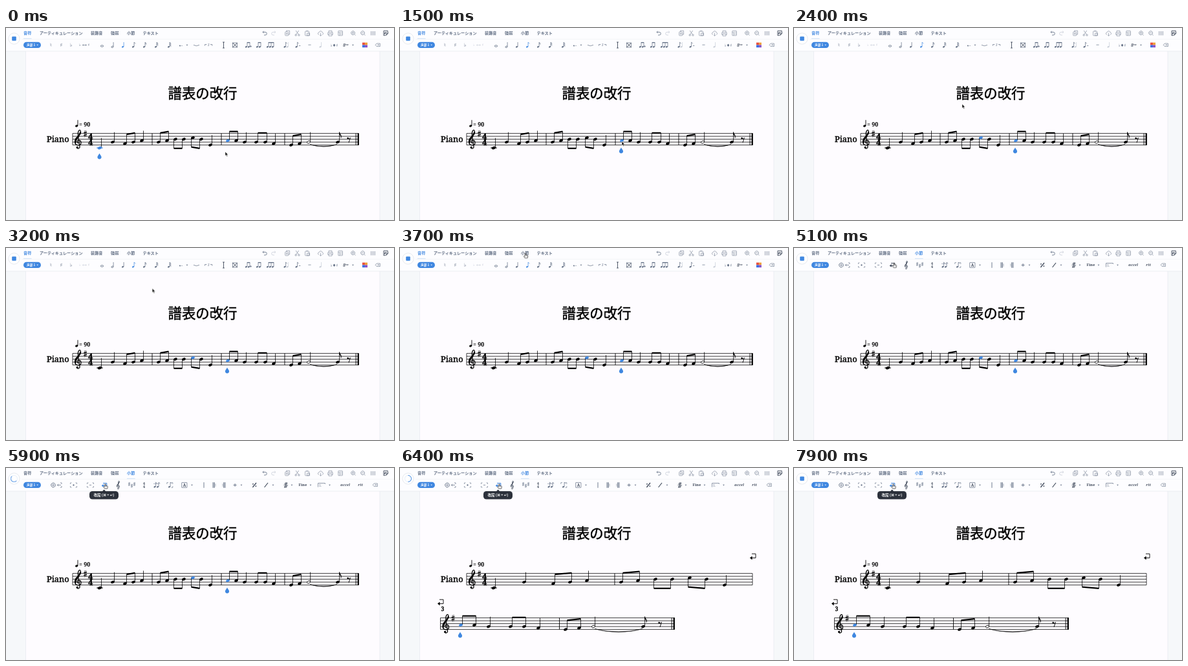
Write an HTML page that moves like this. It is 600 by 298 pixels and loops after 8 s.

```html
<!DOCTYPE html>
<html lang="ja">
<head>
<meta charset="utf-8">
<title>譜表の改行</title>
<style>
html, body { margin: 0; width: 100%; height: 100%; overflow: hidden; background: #f6f8fa; }
svg { display: block; width: 600px; height: 298px; font-family: 'Noto Sans CJK JP', 'Noto Sans', sans-serif; }
.serif { font-family: 'Noto Serif', serif; }
.sym { font-family: 'DejaVu Sans', sans-serif; }
.mid { text-anchor: middle; }
.bold { font-weight: 700; }
.ital { font-style: italic; }
.heavy { stroke: #000; stroke-width: .45px; }
.soft { opacity: .75; }
#pointer { animation: move 8s linear infinite; }
.spin { transform-origin: 12.5px 16.5px; animation: spin .8s steps(8) infinite; }
@keyframes spin { to { transform: rotate(360deg); } }
@keyframes move {
  0% { transform: translate(339px, 192px); }
  3.75% { transform: translate(339px, 192px); animation-timing-function: steps(6, start); }
  11.25% { transform: translate(343px, 176px); }
  25% { transform: translate(343px, 176px); animation-timing-function: steps(2, start); }
  27.5% { transform: translate(291px, 166px); animation-timing-function: steps(3, start); }
  31.25% { transform: translate(260px, 118px); animation-timing-function: steps(2, start); }
  33.75% { transform: translate(252px, 106px); }
  36.25% { transform: translate(252px, 106px); animation-timing-function: steps(9, start); }
  47.5% { transform: translate(194px, 8.5px); }
  52.5% { transform: translate(194px, 8.5px); animation-timing-function: steps(6, start); }
  60% { transform: translate(187.5px, 9px); animation-timing-function: steps(3, start); }
  63.75% { transform: translate(155px, 23px); animation-timing-function: steps(5, start); }
  70%, 100% { transform: translate(153.5px, 25px); }
}
</style>
</head>
<body>
<svg id="stage" viewBox="0 0 600 298"></svg>
<script>
const LOOP = 8000, SELECT = 1100, HOVER = 2100, TAB = 4400, TIP = 5300, BREAK = 6100;
const ink = '#5f6c82', dark = '#414b5c', blue = '#3f87e0', pale = '#c9ced8', black = '#000';
let css = '', count = 0;

// Group that is visible only from a to b (ms)
function show(a, b, body) {
  const key = (t, v) => `${t / LOOP * 100}%{visibility:${v}}`;
  const name = 'show' + count++;
  css += `@keyframes ${name}{${a ? key(0, 'hidden') : ''}${key(a, 'visible')}${b < LOOP ? key(b, 'hidden') : ''}}`;
  return `<g style="animation:${name} ${LOOP}ms step-end infinite">${body}</g>`;
}
const path = (d, c = ink, w = .7, fill = 'none') =>
  `<path d="${d}" stroke="${c}" stroke-width="${w}" fill="${fill}"/>`;
const shape = (d, fill) => path(d, 'none', 0, fill);
const text = (x, y, size, s, c = ink, cls = '') =>
  `<text x="${x}" y="${y}" font-size="${size}" fill="${c}" class="${cls}">${s}</text>`;
const rect = (x, y, w, h, fill, r = 0, stroke = 'none') =>
  `<rect x="${x}" y="${y}" width="${w}" height="${h}" rx="${r}" fill="${fill}" stroke="${stroke}" stroke-width=".7"/>`;
const oval = (x, y, rx, ry, fill, stroke = 'none', turn = -22) =>
  `<ellipse rx="${rx}" ry="${ry}" fill="${fill}" stroke="${stroke}" stroke-width=".8" transform="translate(${x} ${y}) rotate(${turn})"/>`;
const at = (x, y, body, k = 1) => `<g transform="translate(${x} ${y}) scale(${k})">${body}</g>`;
const caret = x => shape(`M${x - 1.4},25.8h2.8l-1.4,1.6z`, ink);

/* ---- score ---- */
const steps = 'CDEFGABc', GAP = 4.5, BASE = 182;
const pitchY = p => BASE - (steps.indexOf(p) - 2) * GAP / 2;
const head = (x, y, c = black) => oval(x, y, 2.9, 2, c);

function clef(c, w = 1.2) {
  return path('M.3,1.6C-2.4,1.2 -2.4,-2.6 .6,-2.8C4.6,-2.9 5,4.3 .3,4.5C-6.4,4.6 -6.6,-3.6 -1.5,-7.5C2.5,-10.5 3.8,-13 3,-16C2.4,-18 1,-17.6 0,-15.5C-1.3,-12.6 -.7,-9.5 0,-6L1.9,6C2.3,9 -.5,10 -2,8.6', c, w)
    + path('M-4.4,1.5C-4.5,-2 -3,-5.5 1,-9M3,-15C3,-12.5 1,-10 -1,-8', c, w + .8) + oval(-1.7, 7.7, 1.5, 1.5, c);
}
const sharp = c => path('M-1,-5.5V6M1.2,-6V5.5', c, .7) + path('M-2.6,-1.4L2.7,-2.8M-2.6,2.8L2.7,1.4', c, 1.4);

function tinted(p, x) {
  const y = pitchY(p), ledger = c => p == 'C' ? path(`M${x - 4.6},${y}h9.2`, c, .8) : '';
  const draw = c => ledger(c) + head(x, y, c);
  if (x == 145) return show(0, SELECT, draw(blue)) + show(SELECT, LOOP, draw(black));
  if (x == 289 && p == 'c') return show(0, HOVER, draw(black)) + show(HOVER, BREAK, draw(blue));
  return draw(x == 343 || x == 94 ? blue : black);
}

// One token per beat: a single letter is a quarter note, two letters are beamed eighths
function bar(tokens, xs) {
  let i = 0;
  return tokens.split(' ').map(tok => {
    const down = [...tok].every(p => 'Bc'.includes(p)), dir = down ? 1 : -1;
    const len = (tok.length > 1 ? 14.2 : 15.4) * dir;
    const notes = [...tok].map(p => ({ p, x: xs[i++], y: pitchY(p) }));
    const ends = notes.map(n => [n.x - 2.5 * dir, n.y + len]);
    return notes.map((n, k) => path(`M${ends[k][0]},${n.y - .5}V${ends[k][1]}`, black, .8)).join('')
      + (ends[1] ? path(`M${ends[0]}L${ends[1]}`, black, 2.2) : '')
      + notes.map(n => tinted(n.p, n.x)).join('');
  }).join('');
}

function staff(x1, x2) {
  let d = `M${x1},164V182M${x2},164V182`;
  for (let k = 0; k < 5; k++) d += `M${x1},${164 + k * GAP}H${x2}`;
  return path(d, black, .75) + at(x1 + 9, 177.5, clef(black), 1.08) + at(x1 + 19.5, 164.5, sharp(black), .9);
}
const barline = x => path(`M${x},164V182`, black, .9);
const finale = x => barline(x - 3.6) + path(`M${x},163.7V182.3`, black, 2.2);

// Tied half and eighth, then the eighth rest
function ending(a, b, r) {
  const y = pitchY('G'), x1 = a + 2, x2 = b - 1, top = y + 3.2;
  const bend = (x2 - x1) / 4, low = top + 1.5 + bend / 4;
  return oval(a, y, 2.6, 1.8, '#fff', black) + path(`M${a + 2.6},${y - .5}V162M${b + 2.6},${y - .5}V162`, black, .8)
    + head(b, y) + path(`M${b + 2.6},162c.3,3 4.2,4.4 2.4,9c.5,-3 -1,-4.5 -2.4,-5z`, black, .5, black)
    + path(`M${x1},${top}C${x1 + bend},${low + 1} ${x2 - bend},${low + 1} ${x2},${top}C${x2 - bend},${low} ${x1 + bend},${low} ${x1},${top}z`, black, .4, black)
    + oval(r - 1.3, 171.4, 1.3, 1.3, black) + path(`M${r - 1.6},172.2Q${r + 1},173 ${r + 2.4},170.8L${r},178.4`, black, .9);
}

const drop = (x, y) => at(x, y, shape('M0,-4.6C.8,-2.4 3.1,-.6 3.1,1.3A3.1,3.1 0 0 1 -3.1,1.3C-3.1,-.6 -.8,-2.4 0,-4.6z', blue));
const wrap = (x, y) => at(x, y, path('M-2,-4.4H4V2H-2.5', black, .9) + shape('M-5,2L-1.4,-.8V4.8z', black));

const tunes = ['C G FG A', 'GA BB cB E', 'AA G GG F', 'EF'];
const meter = [173, 182].map(y => text(130.7, y, 12.6, 4, black, 'serif bold mid heavy')).join('');

const oneLine = staff(103, 545) + meter
  + bar(tunes[0], [145, 165, 184, 197, 210]) + barline(226)
  + bar(tunes[1], [236, 249, 262, 275, 289, 302, 316]) + barline(333)
  + bar(tunes[2], [343, 356, 369, 387, 401, 414]) + barline(431)
  + bar(tunes[3], [441, 454]) + ending(468, 513, 530) + finale(544.7);

const twoLines = staff(103, 545) + meter
  + bar(tunes[0], [145, 192, 237, 263, 289]) + barline(332)
  + bar(tunes[1], [342, 368, 395, 421, 448, 474, 502]) + wrap(546, 138)
  + at(0, 69, staff(62.5, 424.5)
    + bar(tunes[2], [94, 115, 137, 171, 192, 214]) + barline(246.5)
    + bar(tunes[3], [256, 277]) + ending(299, 376, 402) + finale(423.7) + drop(93, 190.4))
  + wrap(63, 209) + text(66, 222.4, 8.6, 3, black, 'serif mid heavy');

const score = text(304, 109.4, 21.4, '譜表の改行', black, 'mid heavy')
  + text(63, 177, 12.8, 'Piano', black, 'serif heavy')
  + oval(109.2, 152, 2.2, 1.6, black) + path('M111,151.6V142.8', black, .9)
  + text(113, 153, 8.9, '= 90', black, 'serif bold')
  + at(0, -.4, show(0, BREAK, oneLine) + show(BREAK, LOOP, twoLines))
  + show(0, SELECT, drop(144.5, 199)) + show(SELECT, BREAK, drop(342, 190));

/* ---- toolbar ---- */
const tab = (x, s, c = ink) => text(x, 10.3, 6.15, s, c, 'bold');
const active = (x, s) => tab(x, s, blue) + path(`M${x},16.4h12.6`, '#bcd6f5', .7);
const tabs = show(0, TAB, active(27, '音符') + tab(187, '小節'))
  + show(TAB, LOOP, tab(27, '音符') + active(187, '小節'))
  + tab(52, 'アーティキュレーション') + tab(131, '装飾音') + tab(162, '強弱') + tab(211.5, 'テキスト');

const turn = (x, k, c) => `<g transform="translate(${x} 8) scale(${k} 1)">${path('M-2.8,-1.6H1A2.3,2.3 0 0 1 1,3H-1M-1.2,-3.4L-3,-1.6L-1.2,.2', c, .8)}</g>`;
const lens = (x, v) => at(x, 8, path(`M2,1.9L3.6,3.6M-2,-.3H1.2${v}`) + oval(-.4, -.3, 2.9, 2.9, 'none', ink));
const actions = turn(400, 1, ink) + turn(414, -1, pale) + '<g class="soft">'
  + rect(431.7, 6, 5, 5.8, 'none', .8, ink) + path('M433.5,6V4.2H438.6V10H436.7M434.2,7.4v3M432.7,8.9h3')
  + path('M448.2,4L452.4,10M452.8,4L448.6,10') + oval(448.2, 11, 1.1, 1.1, 'none', ink) + oval(453, 11, 1.1, 1.1, 'none', ink)
  + rect(462.6, 5, 6, 6.8, 'none', .8, ink) + path('M464.2,4.6h3M465.6,8h4v3.8h-4z')
  + path('M484,10.2C481.6,10 482,7 484,7C484.6,4 489,4.2 489,7C491.2,7.2 491,10 489.2,10.2M486.6,7.6V12.2M485,10.8L486.6,12.2L488.2,10.8')
  + path('M499,7V4.4H504V7M499,10.4H497.8V7H505.2V10.4H504M499,9.2H504V12.2H499z')
  + rect(513.8, 4.5, 6.6, 7.2, 'none', .5, ink) + path('M513.8,6.8H520.4M516,6.8V11.7M516,9.3H520.4', ink, .6)
  + lens(537, 'M-.4,-1.9V1.3') + lens(552, '')
  + path('M564.5,5V11.4M566.6,5V11.4M568.6,5V11.4M570.6,5V11.4') + '</g>'
  + path('M584,4.4H590.4V8M584,4.4V11.6H587', dark, .9) + path('M585.6,6.4V10M587.6,6V9', dark, 1.2)
  + path('M587.6,11.4L591,7.4', dark, 1.4);

function mini(x, flags = 0, c = ink, hollow = false) {
  let d = `M${x + .6},29.2V22`;
  for (let k = 0; k < flags; k++) d += `M${x + .6},${22.2 + k * 1.5}l2.2,1.9`;
  return path(d, c) + oval(x - 1, 29.3, 1.6, 1.1, hollow ? '#fff' : c, hollow ? c : 'none');
}
const beamed = (x, n) => {
  const left = x - 2 * n;
  let s = path(`M${left},22.6h${4 * n}`, ink, 1.3);
  for (let k = 0; k <= n; k++) s += mini(left - .6 + 4 * k);
  return s;
};
const swap = c => text(121, 28.3, 5.6, '♭', c, 'sym" dx="-8') + text(126.5, 28.3, 5.6, '♯', c, 'sym')
  + path('M118.4,26.5h6M119.8,25.2l-1.4,1.3l1.4,1.3M123,25.2l1.4,1.3l-1.4,1.3', c, .6);
const erase = x => path(`M${x - 3.8},26.3l2,-2.3H${x + 3.4}v4.6H${x - 1.8}zM${x - .2},25.2l2.2,2.2m0,-2.2l-2.2,2.2`, ink, .6);

const noteTools = [[69.5, '♮'], [85.5, '♯'], [100.5, '♭']].map(([x, s]) => text(x, 29, 7.8, s, ink, 'sym mid')).join('')
  + show(0, SELECT, swap(ink)) + show(SELECT, TAB, swap(pale))
  + oval(148.5, 28, 2.1, 1.3, 'none', ink, 0) + mini(165.5, 0, ink, true)
  + show(0, SELECT, mini(181.5, 0, blue) + mini(197.5, 1)) + show(SELECT, TAB, mini(181.5) + mini(197.5, 1, blue))
  + mini(214.5, 2) + mini(232.5, 3) + mini(252.5, 4)
  + oval(269, 27.5, 1, 1, ink) + oval(272, 27.5, .6, .6, ink) + caret(280)
  + path('M290,26.4Q294.5,29 299,26.4')
  + path('M307.5,27.6V25.6H310.4M316,25.6H318.8V27.6') + text(313.3, 27.8, 4.6, 3, ink, 'serif mid ital')
  + path('M336.5,22V31M335,22H338M335,31H338', dark, .9)
  + rect(350.6, 23, 7, 7, 'none', 0, ink) + path('M350.6,23L357.6,30M357.6,23L350.6,30', dark, 1)
  + beamed(375, 1) + path('M377,28.6h3M378.5,27.1v3', ink, .7) + beamed(392, 1) + beamed(410, 2)
  + mini(432, 1) + mini(436, 0, pale) + mini(450, 1) + path('M453,27.5h2.4')
  + path('M467.4,26.2H471.6', '#9aa4b3', 1.1) + mini(487, 0, pale)
  + text(507.5, 28.6, 6.2, '♭♦♯', ink, 'sym mid')
  + text(525.5, 28.6, 6.2, '8<tspan font-size="4" dy="-2">va</tspan>', dark, 'serif mid ital bold') + caret(536.5)
  + ['#e8503f', '#f0a03a', '#3f6fe0', '#8a55c8'].map((c, k) => rect(551 + k % 2 * 4, 22.6 + (k >> 1) * 3.8, 4, 3.8, c)).join('')
  + erase(575);

const half = x => `M${x + 3},23H${x + 5}V25M${x + 5},28V30H${x + 3}`;
const bracket = x => path(`M${x - 3},23H${x - 5}V25M${x - 5},28V30H${x - 3}${half(x)}`, ink, .6);
const enter = c => path('M150,23.6H155.8V27.4H149', c, 1) + shape('M147.6,27.4L150.8,25V29.8z', c);
const thinBar = x => path(`M${x},22.2V30.8`, ink, .9);
const repeat = (x, dir) => thinBar(x) + path(`M${x + 2 * dir},22.2V30.8`, ink, 1.3)
  + oval(x + 4 * dir, 25.3, .6, .6, ink) + oval(x + 4 * dir, 27.7, .6, .6, ink);
const barTools = oval(73, 26.5, 3.3, 3.3, 'none', ink) + path('M71.2,26.5h3.6M73,24.7v3.6M85,26.5H79.4M81.2,24.7L79.4,26.5L81.2,28.3' + half(81))
  + bracket(104.5) + path('M102.9,26.5h3.2M104.5,24.9v3.2') + bracket(130.5) + path('M128.9,26.5h3.2')
  + show(TAB, TIP, enter(dark)) + show(TIP, LOOP, enter(blue))
  + at(173.8, 28.3, clef(dark, 1.4), .48)
  + [190.5, 194.5, 198.5].map((x, k) => at(x, 25 + k % 2 * 2.6, sharp(ink), .55)).join('')
  + [26.3, 31].map(y => text(213.5, y, 6, 4, dark, 'serif bold mid')).join('')
  + mini(231, 1) + mini(235.5, 1) + path('M228,24.4h9', ink, .5)
  + path('M248.8,25V22.6H251M255.6,22.6H257.8V25M257.8,28V30.4H255.6', ink, .6) + mini(253.5, 1)
  + rect(271.7, 22.6, 8.2, 7.8, 'none', .4, ink) + text(275.8, 28.9, 6.4, 'A', dark, 'serif mid bold') + caret(287.5)
  + thinBar(306) + repeat(320, 1) + repeat(339, -1)
  + path('M351.6,26.5h5M354.1,24v5', ink, .9) + caret(364)
  + path('M381.4,30L387,23', dark, 1.3) + oval(382, 24.8, .9, .9, dark) + oval(386.4, 28.2, .9, .9, dark)
  + path('M399.6,30L405,23', dark, 1.2) + caret(413)
  + path('M434.6,24.2C433.4,22 430.4,23.4 432,25.4L433.6,27.4C435.2,29.6 432,31 430.8,28.8M430.4,30.4L435,22.8', dark, 1.1)
  + oval(430.4, 26.4, .7, .7, dark) + oval(435.2, 26.8, .7, .7, dark) + caret(442)
  + text(458.8, 28.3, 5.8, 'Fine', dark, 'serif bold mid') + caret(471)
  + path('M482.6,29.6V23.6H493.4V25') + text(486, 29, 4.6, '1.', ink, 'serif mid') + caret(500.5)
  + text(524.5, 28, 5.7, 'accel', dark, 'serif bold ital mid') + text(548, 28, 5.7, 'rit', dark, 'serif bold ital mid')
  + erase(571);

const tip = rect(129, 36, 45, 12.6, '#2c313b', 4.6) + shape('M148.8,36.2L151.6,33.4L154.4,36.2z', '#2c313b')
  + `<text x="151.5" y="44.2" font-size="5.5" fill="#fff" class="mid bold">改段 (<tspan class="sym">⌘</tspan> + <tspan class="sym">↵</tspan>)</text>`;

const mark = rect(9.2, 13.2, 6.6, 6.6, blue, 1);
const badge = oval(12.5, 16.5, 8.6, 8.6, '#fff', '#dfe3ea', 0)
  + show(0, 5800, mark) + show(6500, LOOP, mark)
  + show(5800, 6500, oval(12.5, 16.5, 5, 5, 'none', '#dbe7f8', 0)
    + `<g class="spin">${path('M12.5,11.5A5,5 0 0 1 12.5,21.5', blue, 1)}</g>`);

const frame = rect(30.5, 30, 547.5, 280, '#fefcff', 0, '#e6e8ee') + rect(0, 0, 600, 36, '#fdfdff')
  + path('M0,36H600', '#e7eaef', .8) + path('M24,17.4H600', '#f0f2f6', .7);
const voice = rect(27, 21.8, 27, 9.2, blue, 4.6) + text(32, 28, 4.7, '声部 1', '#fff', 'bold') + shape('M47.4,25.7h2.6l-1.3,1.5z', '#fff');

const arrow = path('M0,0V6.4L1.5,5.1L2.5,7.4L3.6,6.9L2.6,4.7H4.5z', '#fff', .5, '#111');
const hand = path('M-.7,0Q0,-.9 .7,0V2.4L3.2,3Q4,3.3 3.8,4.4L3.2,7H-.9L-2.7,4.4Q-2.5,3.2 -.7,4.2z', '#222', .7, '#fff')
  + path('M1.2,3V4.2M2.4,3.2V4.4', '#222', .4);

document.getElementById('stage').innerHTML = frame + score + badge + tabs + actions + voice
  + show(0, TAB, noteTools) + show(TAB, LOOP, barTools) + show(TIP, LOOP, tip)
  + `<g id="pointer">${show(0, 3600, arrow)}${show(3600, LOOP, hand)}</g>`;
document.head.appendChild(document.createElement('style')).textContent = css;
</script>
</body>
</html>
```
